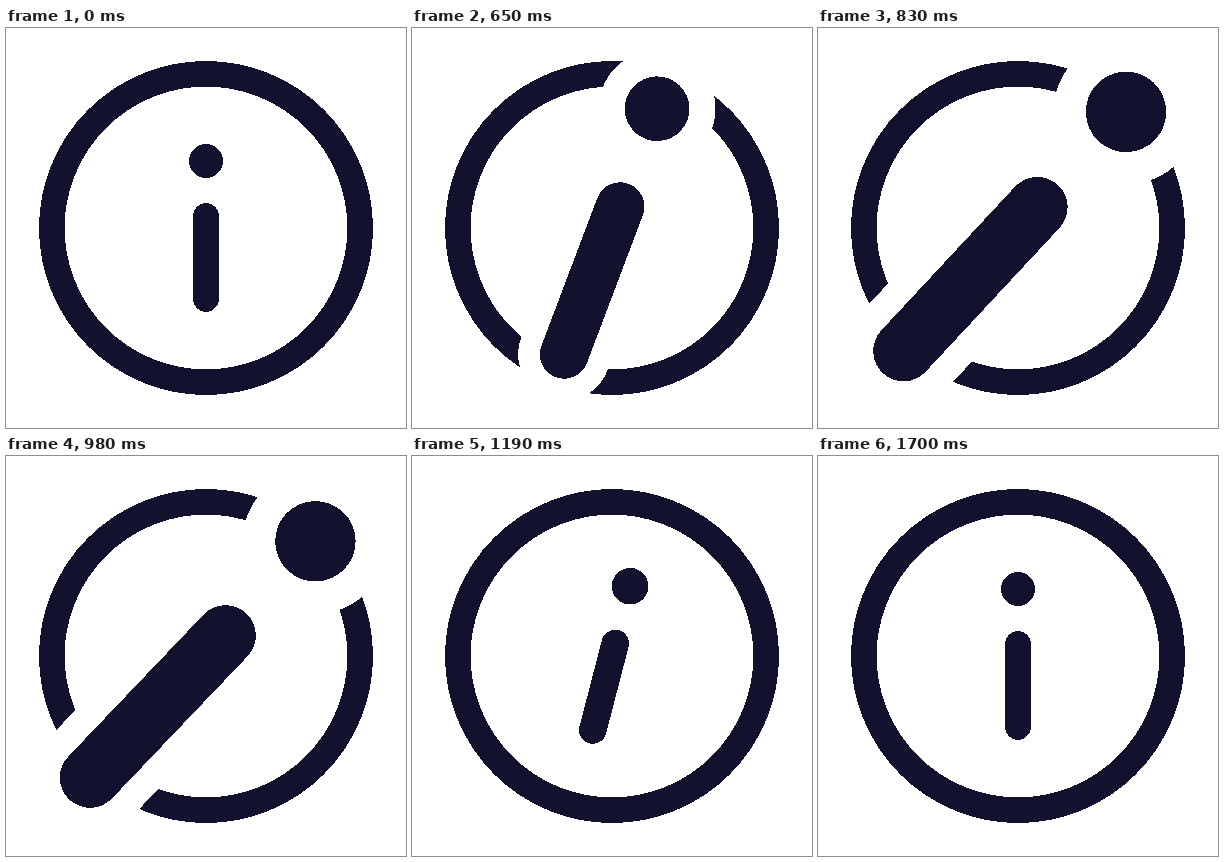
Write an HTML page that moves like this. It is 400 by 400 pixels and loops after 1730 ms.

```html
<!DOCTYPE html>
<html lang="en">
<head>
<meta charset="utf-8">
<title>Info icon</title>
<style>
  html, body { margin: 0; width: 100%; height: 100%; overflow: hidden; background: #fff; }
  svg { display: block; width: 100%; height: 100%; shape-rendering: crispEdges; }
</style>
</head>
<body>
<svg viewBox="0 0 400 400" fill="#12122f" stroke-linecap="round">
  <circle cx="200" cy="200" r="154.2" fill="none" stroke="#12122f" stroke-width="25.6"/>
  <g id="letter">
    <!-- white halo that cuts the ring -->
    <g fill="#fff" stroke="#fff">
      <circle cy="-67" r="30.7" stroke="none"/>
      <path d="M0-12V71" stroke-width="48.4"/>
    </g>
    <circle cy="-67" r="17"/>
    <path d="M0-12V71" stroke="#12122f" stroke-width="25.6"/>
  </g>
</svg>
<script>
const LOOP = 1730, START = 530, STEP = 30;
const letter = document.getElementById('letter');

// Eased curve with handles (x1, 0) and (x2, 1).
function ease(x, x1, x2) {
  let lo = 0, hi = 1;
  for (let i = 0; i < 24; i++) {
    const s = (lo + hi) / 2, r = 1 - s;
    if (3 * s * r * r * x1 + 3 * s * s * r * x2 + s * s * s < x) lo = s;
    else hi = s;
  }
  return lo * lo * (3 - 2 * lo);
}

// Each key: time, value, and the two handles of the ease leading to it.
const scaleKeys = [
  [520, 1],
  [850, 2.37, 0.333, 0.175],
  [1030, 2.365, 0.333, 0.667],
  [1340, 0.795, 0.2, 0.22],
  [1670, 1, 0.333, 0.667]
];
const angleKeys = [
  [520, 0],
  [850, 43.1, 0.333, 0.412],
  [1040, 43.8, 0.333, 0.667],
  [1340, -14.7, 0.333, 0.667],
  [1670, 0, 0.333, 0.667]
];

function valueAt(keys, t) {
  const next = keys.findIndex(key => key[0] > t);
  if (next === 0) return keys[0][1];
  if (next < 0) return keys[keys.length - 1][1];
  const [t0, v0] = keys[next - 1], [t1, v1, x1, x2] = keys[next];
  return v0 + (v1 - v0) * ease((t - t0) / (t1 - t0), x1, x2);
}

function draw(time) {
  const t = time % LOOP;
  const tick = t < START ? 0 : START + Math.floor((t - START) / STEP) * STEP;
  const angle = valueAt(angleKeys, tick), scale = valueAt(scaleKeys, tick);
  letter.setAttribute('transform', `translate(200 200) rotate(${angle}) scale(${scale})`);
}

let origin;
function frame(now) {
  origin ??= now;
  draw(now - origin);
  requestAnimationFrame(frame);
}
draw(0);
requestAnimationFrame(frame);
</script>
</body>
</html>
```
